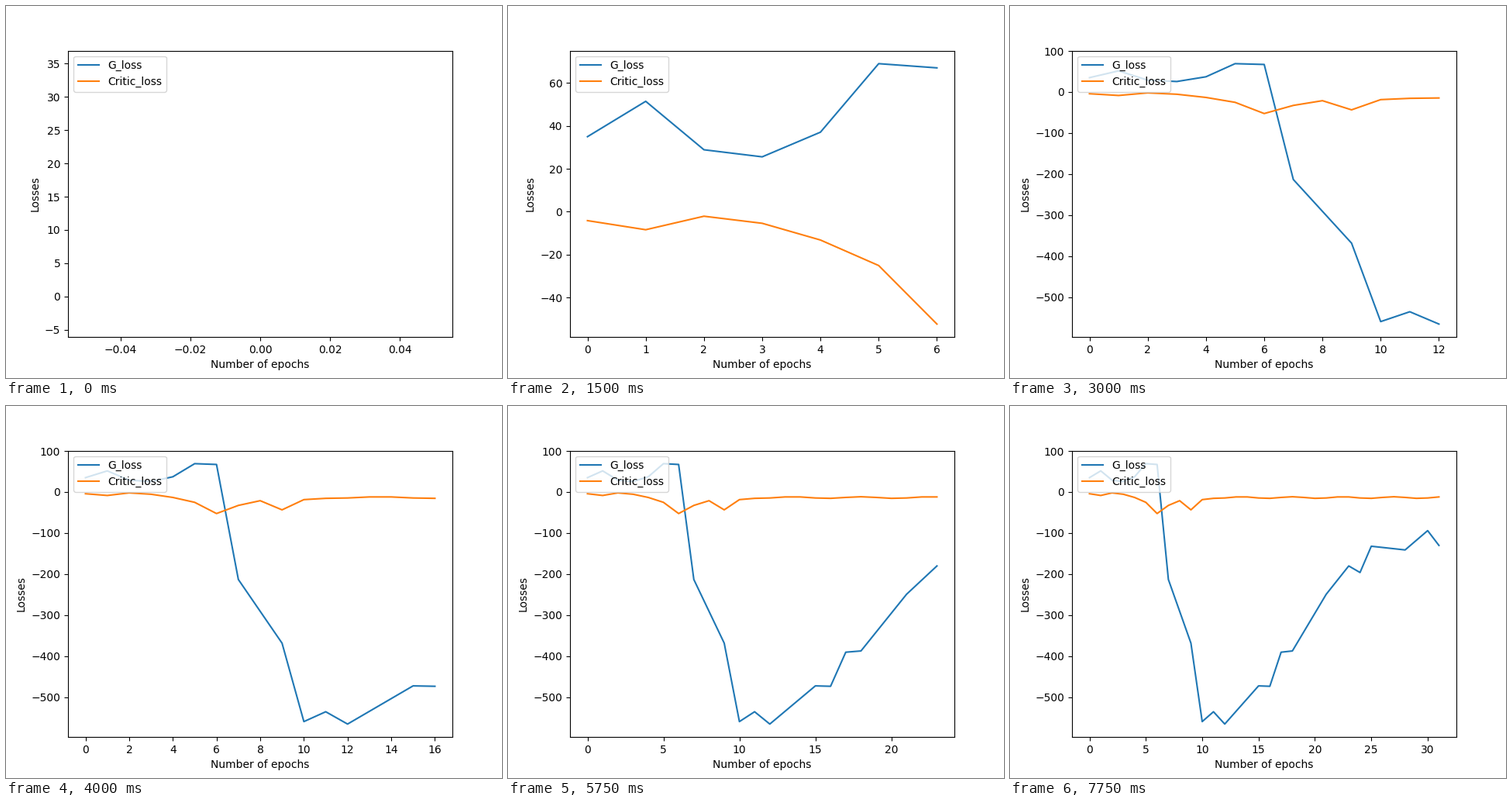
Write a matplotlib script that moves like this. It is 640 px wide and 480 px high and loops after 8000 ms.

```python
import numpy as np
import matplotlib.pyplot as plt
from matplotlib.animation import FuncAnimation

EPOCHS = np.arange(32)

# Turning points as (epoch, loss); straight runs lie between them.
G_TURNS = [
    (0, 35), (1, 51.5), (2, 28.9), (3, 25.6), (4, 37.1), (5, 69.06),
    (6, 67.1), (7, -213), (9, -368), (10, -559), (11, -535), (12, -565),
    (15, -472), (16, -473), (17, -390), (18, -387), (21, -249), (23, -180),
    (24, -196), (25, -132), (28, -141), (30, -94), (31, -130),
]
CRITIC_START = [-4.15, -8.4, -2.1, -5.4, -13.2, -25.1,
                -52.4, -32.6, -21.1, -43.4, -18.5]


def critic_ripple(epoch):
    """Small steady ripple once the critic has settled."""
    return -13.5 + 2 * np.cos(2 * np.pi * (epoch - 18) / 4.5)


g_loss = np.interp(EPOCHS, *zip(*G_TURNS))
critic_loss = critic_ripple(EPOCHS)
critic_loss[:len(CRITIC_START)] = CRITIC_START

fig, ax = plt.subplots(figsize=(6.4, 4.8), dpi=100)
g_line, = ax.plot([], [], label="G_loss")
critic_line, = ax.plot([], [], label="Critic_loss")
ax.set_xlabel("Number of epochs")
ax.set_ylabel("Losses")
ax.legend(loc="upper left")


def update(epoch):
    """Show all losses up to the given epoch and refit the axes."""
    shown = slice(epoch + 1)
    g_line.set_data(EPOCHS[shown], g_loss[shown])
    critic_line.set_data(EPOCHS[shown], critic_loss[shown])
    ax.relim()
    ax.autoscale_view()
    return g_line, critic_line


anim = FuncAnimation(fig, update, frames=len(EPOCHS), interval=250,
                     repeat=True, repeat_delay=0)
plt.show()
```
